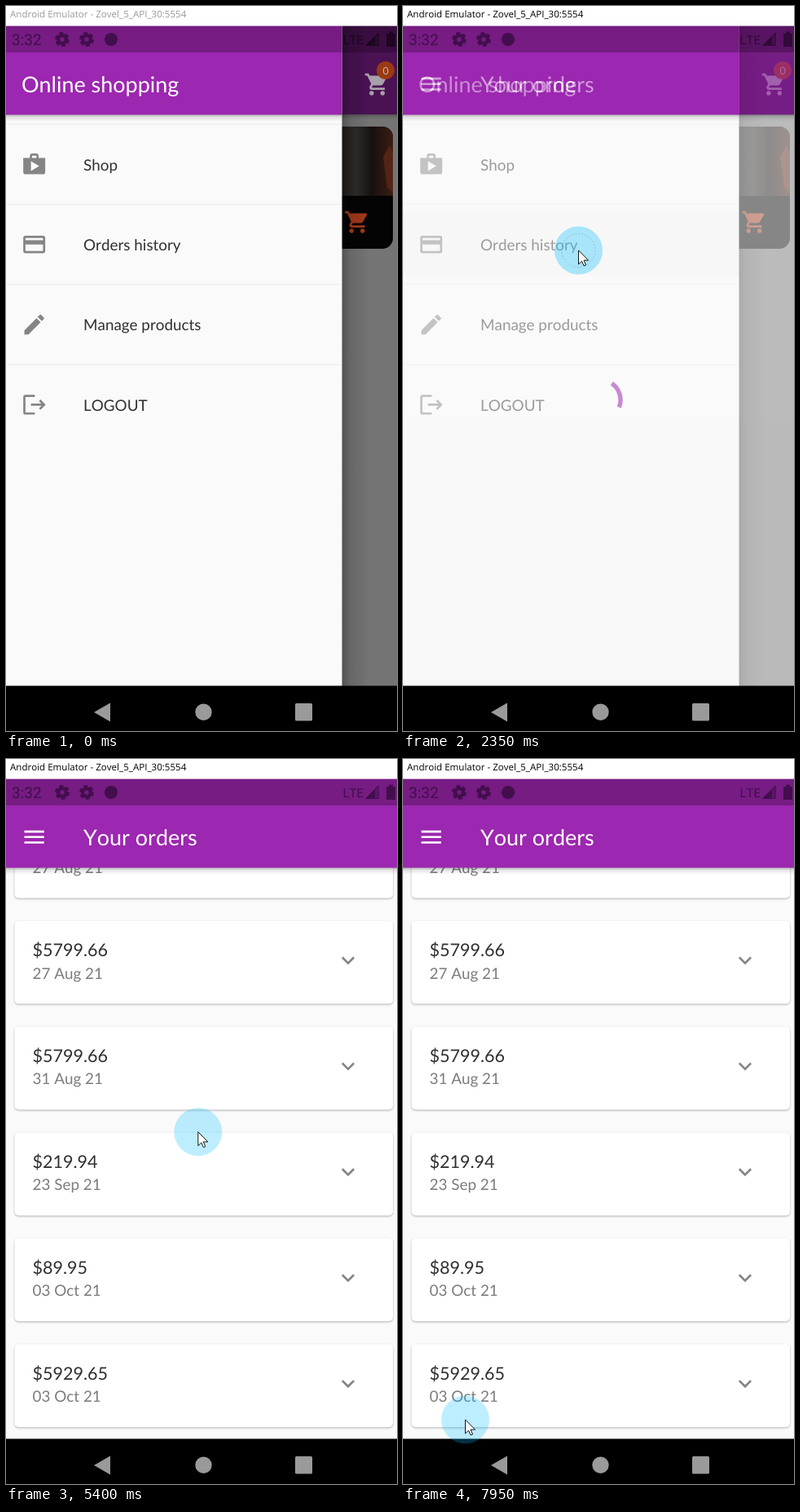
An HTML page for the animation above (8000 ms loop, 480 px wide and 890 px high).

```html
<!DOCTYPE html>
<html lang="en">
<head>
<meta charset="utf-8">
<title>Online shopping</title>
<style>
html, body { margin: 0; width: 100%; height: 100%; overflow: hidden; background: #000; }
svg { display: block; width: 100vw; height: 100vh; font-family: Lato, sans-serif; font-kerning: none; text-rendering: geometricPrecision; }
.bar { font-size: 26.94px; fill: #fff; }
.row { font-size: 18.86px; fill: #303030; }
.price { font-size: 21.55px; fill: #303030; }
.date { font-size: 18.86px; fill: #7c7c7c; }
.card { fill: #fff; filter: drop-shadow(0 1px 1px rgba(0,0,0,.3)); }
</style>
</head>
<body>
<svg id="stage" viewBox="0 0 480 890"></svg>
<script>
const DP = 1.347, PURPLE = '#9c27b0';
const CLICK = 2000, FADE = 2140, LOADED = 2600;
const ICONS = {
  shop: 'M16 6V4c0-1.11-.89-2-2-2h-4c-1.11 0-2 .89-2 2v2H2v13c0 1.11.89 2 2 2h16c1.11 0 2-.89 2-2V6zm-6-2h4v2h-4zM9 18V9l7.5 4.5z',
  card: 'M20 4H4a2 2 0 0 0-2 2v12a2 2 0 0 0 2 2h16a2 2 0 0 0 2-2V6a2 2 0 0 0-2-2zm0 14H4v-6h16zm0-10H4V6h16z',
  edit: 'M3 17.25V21h3.75L17.81 9.94l-3.75-3.75zM20.71 7.04a1 1 0 0 0 0-1.41l-2.34-2.34a1 1 0 0 0-1.41 0l-1.83 1.83 3.75 3.75z',
  menu: 'M3 18h18v-2H3zm0-5h18v-2H3zm0-7v2h18V6z',
  more: 'M16.59 8.59L12 13.17 7.41 8.59 6 10l6 6 6-6z',
  cart: 'M1 2v2h2l3.6 7.59-1.35 2.45A2 2 0 0 0 7 17h12v-2H7.42a.25.25 0 0 1-.22-.37l.9-1.63h7.45a2 2 0 0 0 1.75-1.03l3.58-6.49A1 1 0 0 0 20 4H5.21l-.94-2zM5 20a2 2 0 1 0 4 0 2 2 0 1 0-4 0M15 20a2 2 0 1 0 4 0 2 2 0 1 0-4 0'
};
const at = (x, y) => `transform="translate(${x} ${y}) scale(${DP})"`;
const icon = (name, x, y, fill) => `<path d="${ICONS[name]}" ${at(x, y)} fill="${fill}" fill-rule="evenodd"/>`;
const rect = (x, y, w, h, fill, extra = '') => `<rect x="${x}" y="${y}" width="${w}" height="${h}" fill="${fill}" ${extra}/>`;
const text = (x, y, cls, s) => `<text x="${x}" y="${y}" class="${cls}">${s}</text>`;
const appBar = w => rect(0, 133, w, 9, 'url(#under)') + rect(0, 57, w, 76.5, PURPLE) + rect(0, 24, w, 33, '#761c83');

const gear = x => `<g fill="none" stroke="#430e4c"><circle cx="${x}" cy="41" r="4.9" stroke-width="4.4"/>
  <circle cx="${x}" cy="41" r="7.2" stroke-width="3.4" stroke-dasharray="4.6 2.94"/></g>`;
const statusLeft = `<text x="7" y="48" font-family="Roboto, sans-serif" font-size="19" fill="#430e4c">3:32</text>
  ${gear(69)}${gear(99)}<circle cx="129" cy="41" r="8" fill="#430e4c"/>`;
const statusRight = color => `<g fill="${color}">
  <text x="413.500" y="47" font-family="Roboto, sans-serif" font-size="15">LTE</text>
  <path d="M441 49L457.500 32.500V49z" opacity=".45"/><path d="M441 49L453 37V49z"/>
  <path d="M441.500 48.500L457 33V48.500z" fill="none" stroke="${color}"/>
  <path d="M467 34h3v-2.500h5v2.500h3V50h-11z"/></g>`;

const rows = ['Shop', 'Orders history', 'Manage products', 'LOGOUT'];
const logout = `<path d="M12.500 4H4a1 1 0 0 0-1 1v14a1 1 0 0 0 1 1h8.500M9 12h12M17 8l4 4-4 4"
  ${at(18.5, 473.3)} fill="none" stroke="#858585" stroke-width="2"/>`;

const shopPage = `
  ${rect(400, 24, 80, 811, '#747474')}${rect(400, 57, 80, 76, '#4a1253')}${rect(400, 24, 80, 33, '#390d40')}
  ${rect(400, 133, 80, 7, 'url(#under)')}
  ${statusRight('#1d0621')}
  ${icon('cart', 439.4, 80, '#a9a0ab')}
  <circle cx="466" cy="79" r="11" fill="#9a3a12"/>
  <text x="466" y="83.500" font-size="12.500" fill="#c9b3a8" text-anchor="middle">0</text>
  ${rect(380, 148, 95, 150, '#050404', 'rx="13"')}
  <path d="M400 148H462a13 13 0 0 1 13 13V233H400z" fill="url(#photo)"/>
  <path d="M463 185l8-14 4 8v50l-7-6z" fill="#542417"/>
  ${icon('cart', 414.8, 249, '#a5381b')}
  ${rect(412, 24, 34, 811, 'url(#side)')}`;

const drawer = `${rect(0, 24, 412.5, 811, '#fafafa')}${rect(0, 252, 412.5, 79, '#000', 'id="press" opacity="0"')}
  ${appBar(412.5)}${text(19, 106, 'bar', 'Online shopping')}
  ${rows.map((s, i) => rect(0, 144.500 + i * 98.4, 412, 1, '#ebebeb') + text(95, 201.8 + i * 98.3, 'row', s)).join('')}
  ${['shop', 'card', 'edit'].map((n, i) => icon(n, 18.5, 178.3 + i * 98.3, '#858585')).join('')}${logout}`;

const orders = [['219.94', '27 Aug'], ['5799.66', '27 Aug'], ['5799.66', '31 Aug'],
  ['219.94', '23 Sep'], ['89.95', '03 Oct'], ['5929.65', '03 Oct']];
const list = orders.map(([price, day], i) => `<g transform="translate(0 ${i * 129.9})">
  ${rect(10.5, 148, 464.5, 102, '#fff', 'rx="5" class="card"')}
  ${text(32.5, 191.7, 'price', '$' + price)}${text(32.5, 219, 'date', day + ' 21')}
  ${icon('more', 403.8, 180.4, '#858585')}</g>`).join('');

const ordersPage = `${rect(0, 24, 480, 811, '#fafafa')}<g id="list">${list}</g>
  <path id="spin" fill="none" stroke="${PURPLE}" stroke-width="5.4"/>
  ${appBar(480)}${icon('menu', 18.5, 79.6, '#fff')}${text(95, 106, 'bar', 'Your orders')}${statusRight('#430e4c')}`;

const gradient = (id, dir, stops) => `<linearGradient id="${id}" x2="${dir[0]}" y2="${dir[1]}">` +
  stops.map(([o, c, a = 1]) => `<stop offset="${o}" stop-color="${c}" stop-opacity="${a}"/>`).join('') + '</linearGradient>';

stage.innerHTML = `<defs>
  ${gradient('under', [0, 1], [[0, '#000', .3], [.4, '#000', .1], [1, '#000', 0]])}
  ${gradient('side', [1, 0], [[0, '#000', .3], [.3, '#000', .12], [1, '#000', 0]])}
  ${gradient('photo', [1, 0], [[0, '#191614'], [.4, '#302c29'], [.65, '#151110'], [1, '#3a1c12']])}</defs>
  <g id="shop">${shopPage}${drawer}</g><g id="page">${ordersPage}</g>${statusLeft}
  ${rect(0, 0, 480, 24.5, '#fff')}
  <text id="head" x="5" y="14" font-family="Open Sans, Noto Sans, sans-serif" font-size="11.55">Android Emulator - Zovel_5_API_30:5554</text>
  ${rect(0, 834.5, 480, 55.5, '#000')}
  <g fill="#9a9a9a"><path d="M108 867L128 855.500V878.500z"/><circle cx="242.500" cy="866.800" r="10.200"/>${rect(355, 856, 21, 21.5, '#9a9a9a', 'rx="1.5"')}</g>
  <g id="cursor"><circle id="halo" r="29.500" fill="#00beff"/>
  <circle id="ring" fill="none" stroke="#5f9fb8" stroke-dasharray="2 2" opacity=".5"/>
  <path d="M0 0V17l4-3.700L6.600 19l2.400-1L6.500 12.200H12z" fill="#fff" stroke="#111" stroke-linejoin="round"/></g>`;

// Cursor way points: time, x, y
const way = [[50, -40, 640], [400, 200, 640], [650, 235, 430], [900, 162.5, 319.5], [1300, 250, 285],
  [1750, 215.5, 300], [2950, 215.5, 300], [3050, 159, 190], [3130, 180, 136], [3250, 233.5, 245.5],
  [4750, 233.5, 245.5], [5050, 240, 600], [5150, 240, 600], [5450, 235, 430], [6100, 97.5, 756],
  [6350, 70, 780], [6600, 170, 720], [6850, 240, 745], [7050, 120, 792], [7250, 198.5, 774],
  [7400, 251, 740], [7550, 150, 706], [7750, 31, 760], [7950, 76.5, 811], [8000, 76.5, 811]];
const clamp = v => Math.min(1, Math.max(0, v));
const ease = v => (v = clamp(v), v * v * (3 - 2 * v));
const set = (el, attrs) => { for (const k in attrs) el.setAttribute(k, attrs[k]); };
const $ = id => document.getElementById(id);

function arc(from, sweep) {
  const point = deg => {
    const a = deg * Math.PI / 180;
    return `${242.5 + 24.5 * Math.cos(a)} ${483.5 + 24.5 * Math.sin(a)}`;
  };
  return `M${point(from)}A24.5 24.5 0 ${sweep > 180 ? 1 : 0} 1 ${point(from + sweep)}`;
}

function draw(now) {
  const t = now % 8000, e = Math.max(0, t - FADE), loaded = t >= LOADED;
  set($('head'), { fill: t < CLICK ? '#999' : '#000' });
  set($('press'), { opacity: .022 * clamp((t - CLICK) / 120) });
  set($('page'), { opacity: clamp(e / 400) });
  set($('list'), {
    visibility: loaded ? 'visible' : 'hidden',
    transform: `translate(0 ${-79.3 * clamp((t - 5170) / 180)})`
  });
  set($('spin'), {
    visibility: loaded ? 'hidden' : 'visible',
    d: arc(-90 + e / 2222 * 360, 1 + 270 * ease(e / 600))
  });

  const i = Math.max(1, way.findIndex(p => p[0] > t)), [a, x, y] = way[i - 1], [b, u, v] = way[i];
  const k = clamp((t - a) / (b - a)), clicking = t > 2250 && t < 2450;
  set($('cursor'), {
    visibility: t < 50 ? 'hidden' : 'visible',
    transform: `translate(${x + (u - x) * k} ${y + (v - y) * k})`
  });
  set($('halo'), { opacity: clicking ? .32 : .26 });
  set($('ring'), { r: clicking ? 12 + (t - 2250) * .085 : 0 });
}

function loop() {
  draw(performance.now());
  requestAnimationFrame(loop);
}
loop();
</script>
</body>
</html>
```
